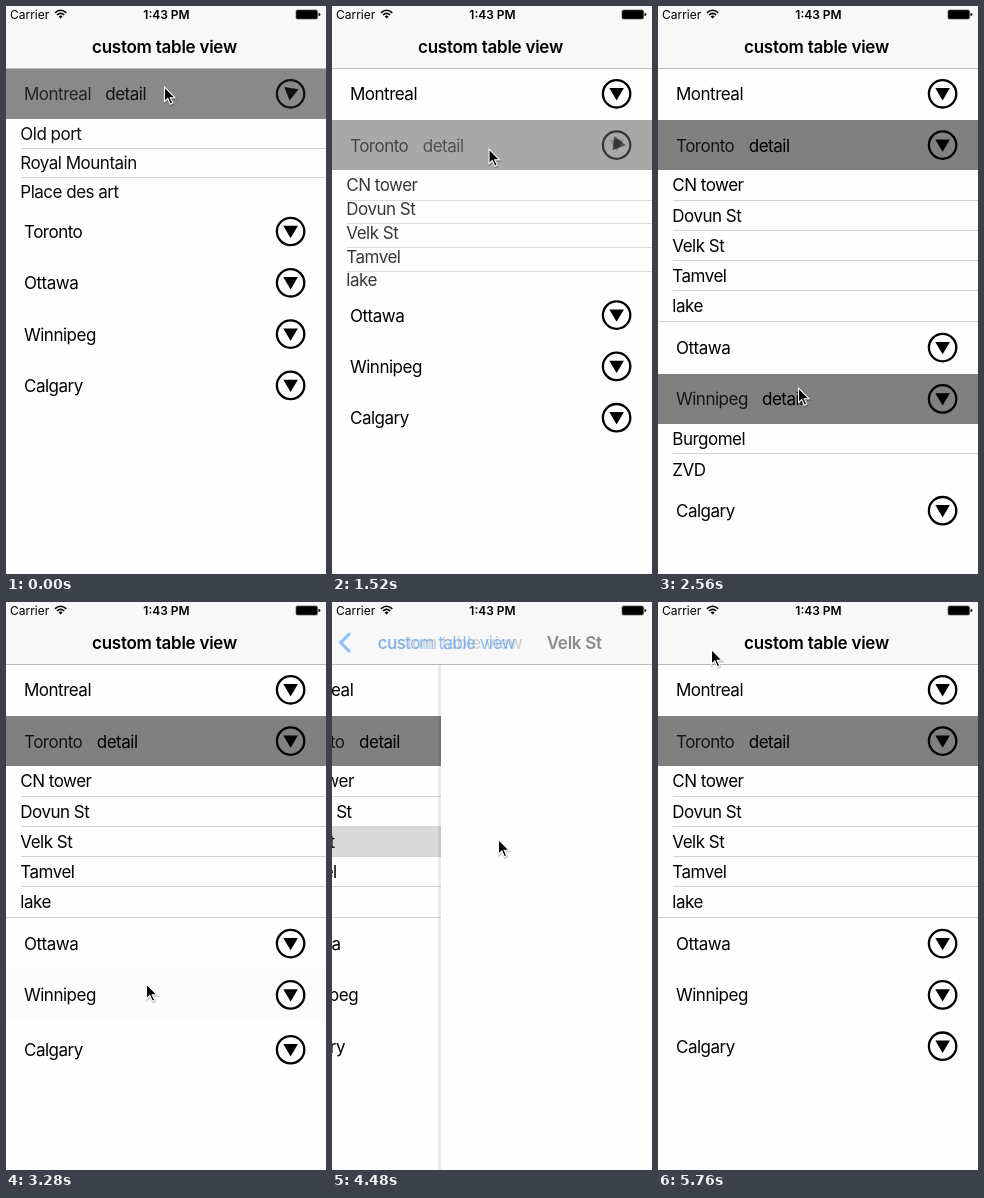
An HTML page for the animation above (7120 ms loop, 320x568 px).

```html
<!DOCTYPE html>
<html lang="en">
<head>
<meta charset="utf-8">
<title>custom table view</title>
<style>
  html, body { margin: 0; width: 100%; height: 100%; overflow: hidden; background: #fefefe; }
  svg { display: block; width: 320px; height: 568px; }
  rect { shape-rendering: crispEdges; }
  text { font: 400 17px Inter, "Liberation Sans", sans-serif; letter-spacing: -0.5px; white-space: pre; }
  .title { font-weight: 600; letter-spacing: -0.25px; }
  .status { font-size: 12px; letter-spacing: 0; }
  .clock { font-size: 12px; font-weight: 600; letter-spacing: 0; }
</style>
</head>
<body>
<svg id="stage" viewBox="0 0 320 568"></svg>
<script>
const LOOP = 7120, STEP = 80;
const PITCH = 51.3, ROW = 30.24, FIRST = 88.1, PAPER = '#fefefe';

// open / close are start times in ms
const sections = [
  { name: 'Montreal', detailX: 99.3, rows: ['Old port', 'Royal Mountain', 'Place des art'], open: -232, close: 851 },
  { name: 'Toronto', detailX: 90.8, rows: ['CN tower', 'Dovun St', 'Velk St', 'Tamvel', 'lake'], open: 1380 },
  { name: 'Ottawa', rows: [] },
  { name: 'Winnipeg', detailX: 104, rows: ['Burgomel', 'ZVD'], open: 2130, close: 3060 },
  { name: 'Calgary', rows: [] }
];
const LINE_AT = 2160, SELECT = 4320, PUSH = 4370, PRESS = 5220, POP = 5330;

// time, x, y of the pointer tip
const path = [
  [0, 158.5, 81], [1040, 158.5, 81], [1280, 157, 143], [1600, 157, 143],
  [2080, 140.5, 382], [3520, 140.5, 382], [4160, 166.5, 237.5], [4560, 166.5, 237.5],
  [5200, 48.5, 42.5], [5320, 48.5, 42.5], [5600, 53.5, 47.5], [LOOP, 53.5, 47.5]
];

function el(parent, tag, attrs = {}, content) {
  const node = document.createElementNS('http://www.w3.org/2000/svg', tag);
  set(node, attrs);
  if (content) node.textContent = content;
  return parent.appendChild(node);
}
function set(node, attrs) {
  for (const key in attrs) node.setAttribute(key, attrs[key]);
}
const move = (node, x, y) => set(node, { transform: `translate(${x} ${y})` });
const rect = (parent, x, y, width, height, fill) => el(parent, 'rect', { x, y, width, height, fill });
const label = (parent, x, y, content, attrs = {}) => el(parent, 'text', { x, y, ...attrs }, content);

// critically damped spring, 0 to 1
function spring(t, start) {
  const x = (t - start) * 0.0207;
  if (!(x > 0)) return 0;
  return x > 8.5 ? 1 : 1 - (1 + x) * Math.exp(-x);
}
function openness(s, t) {
  return s.close !== undefined && t >= s.close ? 1 - spring(t, s.close) : spring(t, s.open);
}
function pointerAt(t) {
  const i = path.findIndex(k => k[0] > t);
  const [t0, x0, y0] = path[i - 1], [t1, x1, y1] = path[i];
  const u = (t - t0) / (t1 - t0), e = u * u * (3 - 2 * u);
  return [x0 + (x1 - x0) * e, y0 + (y1 - y0) * e];
}

function addIcon(parent) {
  const g = el(parent, 'g', { transform: 'translate(284.6 -0.3)' });
  el(g, 'circle', { r: 13.7, fill: 'none', stroke: '#000', 'stroke-width': 2.3 });
  return el(g, 'path', { d: 'M-7.3-5.7H7.3L0 6.7Z' });
}

const stage = document.getElementById('stage');
rect(stage, 0, 0, 320, 568, PAPER);
const list = el(stage, 'g');

// Later sections lie over the rows of earlier ones.
for (const s of sections) {
  s.group = el(list, 'g');
  s.body = el(s.group, 'g');
  s.rowNodes = s.rows.map((name, i) => {
    const g = el(s.body, 'g');
    if (name === 'Velk St') s.picked = rect(g, 0, 0, 320, ROW - 1, '#d9d9d9');
    label(g, 14.3, 21.2, name);
    const last = i === s.rows.length - 1;
    const line = rect(g, last ? 0 : 14.5, ROW - 1, 320, 1, '#d2d2d4');
    if (last) s.lastLine = line;
    return g;
  });
  const head = el(s.group, 'g');
  rect(head, 0, -25.6, 320, 50.5, PAPER);
  s.plain = el(head, 'g');
  label(s.plain, 18, 6.2, s.name);
  addIcon(s.plain);
  if (s.rows.length) {
    s.active = el(head, 'g');
    rect(s.active, 0, -25.6, 320, 50.5, '#808080');
    label(s.active, 18, 6.2, s.name, { fill: '#161616' });
    label(s.active, s.detailX, 6.2, 'detail');
    s.arrow = addIcon(s.active);
  }
}

const page = el(stage, 'g');
rect(page, -3, 63, 3, 505, 'rgba(0,0,0,.08)');
rect(page, 0, 63, 320, 505, PAPER);

rect(stage, 0, 0, 320, 62, '#f8f8f8');
rect(stage, 0, 62, 320, 1, '#b9b9bb');
const title = label(stage, 86, 46.5, 'custom table view', { class: 'title' });
const backLabel = label(stage, 25.3, 46.5, 'custom table view', { fill: '#007aff' });
const chevron = el(stage, 'path', { d: 'M18 31.2L8.6 40.6L18 50', fill: 'none', stroke: '#007aff', 'stroke-width': 3 });
const pageTitle = label(stage, 171, 46.5, 'Velk St', { class: 'title' });

// Status bar
label(stage, 4, 12.6, 'Carrier', { class: 'status' });
label(stage, 160.5, 12.6, '1:43 PM', { class: 'clock', 'text-anchor': 'middle' });
el(stage, 'path', { d: 'M48.9 6.8Q54.6 1.7 60.3 6.8M51 9Q54.6 5.7 58.2 9', fill: 'none', stroke: '#000', 'stroke-width': 1.6 });
el(stage, 'path', { d: 'M52.6 10.4Q54.6 8.8 56.6 10.4L54.6 12.6Z' });
el(stage, 'path', { d: 'M291.5 4H310Q311.5 4 311.5 5.5V11.5Q311.5 13 310 13H291.5Q290 13 290 11.5V5.5Q290 4 291.5 4Z', stroke: '#555', 'stroke-width': .7 });
el(stage, 'path', { d: 'M312.5 6.8Q314.4 7.2 314.4 8.5T312.5 10.2Z' });

const pointer = el(stage, 'g');
const arrowShape = 'M0 0V14.6L3.3 11.5L5.8 17.2L8.2 16.1L5.7 10.7H10.4Z';
el(pointer, 'path', { d: arrowShape, transform: 'translate(.5 1.2)', fill: 'none', stroke: 'rgba(0,0,0,.18)', 'stroke-width': 2 });
el(pointer, 'path', { d: arrowShape, stroke: '#fff', 'stroke-width': 1.1 });

function drawList(t, popped) {
  let y = FIRST;
  for (const s of sections) {
    move(s.group, 0, y);
    y += PITCH;
    if (!s.rows.length) continue;
    const p = openness(s, t), fade = p ** 1.6;
    s.rowNodes.forEach((row, i) => move(row, 0, 24.9 + i * ROW * p));
    set(s.body, { opacity: p });
    set(s.plain, { opacity: 1 - fade });
    set(s.active, { opacity: fade });
    set(s.arrow, { transform: `rotate(${180 * (1 - p)})` });
    set(s.lastLine, { opacity: s.name === 'Toronto' && t >= LINE_AT ? 1 : 0 });
    if (s.picked) set(s.picked, { opacity: t >= SELECT ? 1 - popped : 0 });
    y += s.rows.length * ROW * p;
  }
}

function draw(t) {
  const popped = spring(t, POP);
  const q = t < POP ? spring(t, PUSH) : 1 - popped;
  drawList(t, popped);
  move(list, -96 * q, 0);
  move(page, 323 * (1 - q), 0);

  const glow = t >= PRESS ? 0.22 : 1;
  set(title, { x: 86 - 61 * q, opacity: Math.max(0, 1 - q * 1.3) });
  set(backLabel, { x: 25.3 + 61 * (1 - q), opacity: q * q * glow });
  set(chevron, { opacity: q * q * glow });
  set(pageTitle, { x: 171 + 130 * (1 - q), opacity: q * q });
  move(pointer, ...pointerAt(t));
}

const begin = performance.now();
function tick() {
  const t = (performance.now() - begin) % LOOP;
  draw(Math.floor(t / STEP) * STEP);
  requestAnimationFrame(tick);
}
tick();
</script>
</body>
</html>
```
